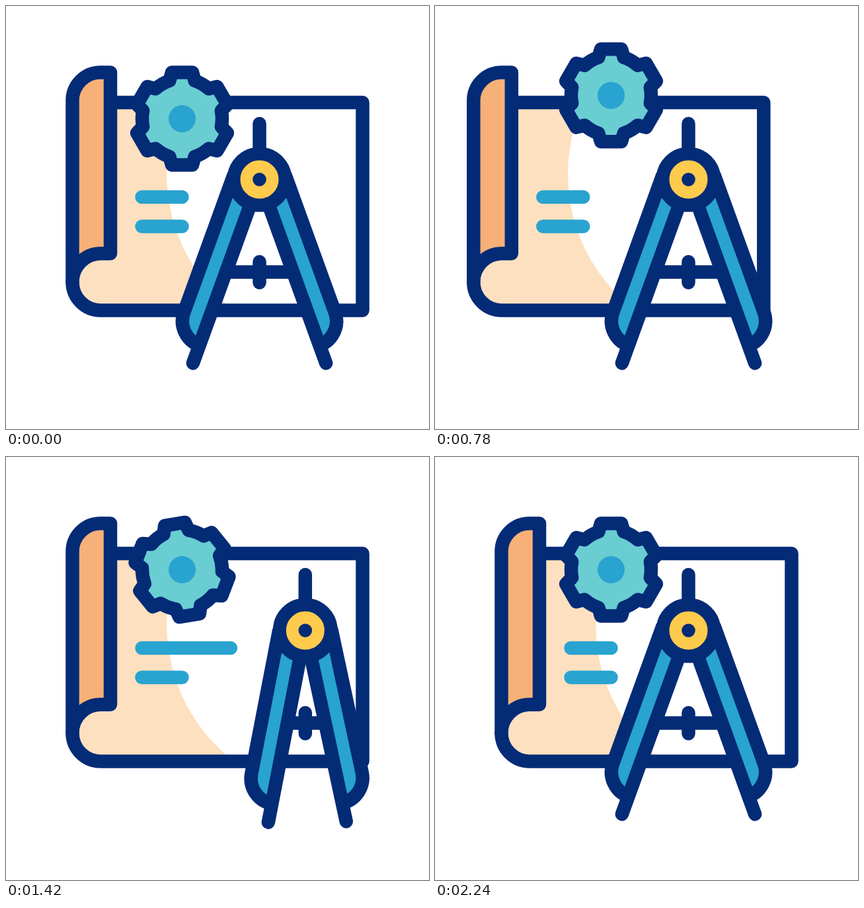
An HTML page that plays this animation: 640x640 px, repeating every 2400 ms.

```html
<!DOCTYPE html>
<html lang="en">
<head>
<meta charset="utf-8">
<title>Blueprint</title>
<style>
  html, body { margin: 0; height: 100%; overflow: hidden; background: #fff; }
  svg { display: block; width: 100vw; height: 100vh; }
  .ink { stroke: #042b76; }
  .blue { stroke: #29a3d0; }
</style>
</head>
<body>
<svg viewBox="0 0 640 640" fill="none" stroke-width="20.5" stroke-linecap="round" stroke-linejoin="round">
  <defs>
    <g id="leg" class="ink">
      <path fill="#29a3d0" stroke="none" d="M0 0H-39V228A39 39 0 0 0 0 267Z"/>
      <path d="M0 0V295.5M-39 8V228A39 39 0 0 0 0 267"/>
    </g>
  </defs>

  <g id="paper">
    <path fill="#fde0bf" d="M158 146H267A260 260 0 0 0 345 460.5H143A43 43 0 0 1 143 375H158Z"/>
    <path class="ink" d="M158 146H539.5V460.5H143A42.75 42.75 0 0 1 100.5 417.5"/>
    <path class="ink" fill="#f7b077" d="M100.5 417.5V143A42.5 42.5 0 0 1 143 100.5H158V374.5H143A42.75 42.75 0 0 0 100.5 417.5Z"/>
    <path class="blue" id="line1"/>
    <path class="blue" id="line2"/>
  </g>

  <g id="gear">
    <path class="ink" id="rim" fill="#69cdd2"/>
    <circle r="20.5" fill="#29a3d0"/>
  </g>

  <g id="compass">
    <path class="ink" id="bar"/>
    <path class="ink" d="M0 124.5V156M0 -84.5V-40"/>
    <use href="#leg" id="left"/>
    <use href="#leg" id="right"/>
    <circle class="ink" r="39" fill="#ffcb4d" stroke-width="20"/>
    <circle r="10.3" fill="#042b76"/>
  </g>
</svg>
<script>
const LOOP = 2400, RAD = Math.PI / 180;
const el = id => document.getElementById(id);
const put = (id, transform) => el(id).setAttribute('transform', transform);
const draw = (id, d) => el(id).setAttribute('d', d);

// Smooth progress from a to b
const ease = (t, a, b) => {
  const p = Math.min(1, Math.max(0, (t - a) / (b - a)));
  return p * p * (3 - 2 * p);
};
// Rise from a to b, hold until c, fall back by d
const swing = (t, a, b, c, d) => ease(t, a, b) - ease(t, c, d);

function gearPath(teeth = 6) {
  const at = (deg, r) => `${r * Math.sin(deg * RAD)} ${-r * Math.cos(deg * RAD)}`;
  const tipR = Math.hypot(15.5, 70), tip = Math.atan2(15.5, 70) / RAD, base = 18.5;
  let d = '';
  for (let i = 0; i < teeth; i++) {
    const a = i * 360 / teeth;
    d += `${i ? 'A60.5 60.5 0 0 1 ' : 'M'}${at(a - base, 60.5)}`
       + `L${at(a - tip, tipR)}L${at(a + tip, tipR)}L${at(a + base, 60.5)}`;
  }
  return d + `A60.5 60.5 0 0 1 ${at(-base, 60.5)}Z`;
}

function render(t) {
  put('paper', `translate(${-42.3 * swing(t, 200, 800, 800, 1400)} 0)`);
  draw('line1', `M205.5 289H${266.5 + 74 * swing(t, 1000, 1400, 1400, 1800)}`);
  draw('line2', `M205.5 333.5H${266.5 + 67 * swing(t, 1600, 1900, 1900, 2200)}`);

  const lift = 35.4 * swing(t, 200, 800, 800, 1200);
  put('gear', `translate(266.5 ${170.5 - lift}) rotate(${180 * ease(t, 1000, 2200)})`);

  const close = swing(t, 1000, 1450, 1760, 2210);
  const left = 19.9 - 9.1 * close, right = 19.9 - 7.9 * close;
  put('compass', `translate(${383.5 + 69.3 * swing(t, 1000, 1400, 1800, 2200)} 262.5)`);
  put('left', `rotate(${left})`);
  put('right', `scale(-1 1) rotate(${right})`);
  draw('bar', `M${-140 * Math.tan(left * RAD)} 140H${140 * Math.tan(right * RAD)}`);
}

draw('rim', gearPath());
const start = performance.now();
function frame() {
  render((performance.now() - start) % LOOP);
  requestAnimationFrame(frame);
}
frame();
</script>
</body>
</html>
```
